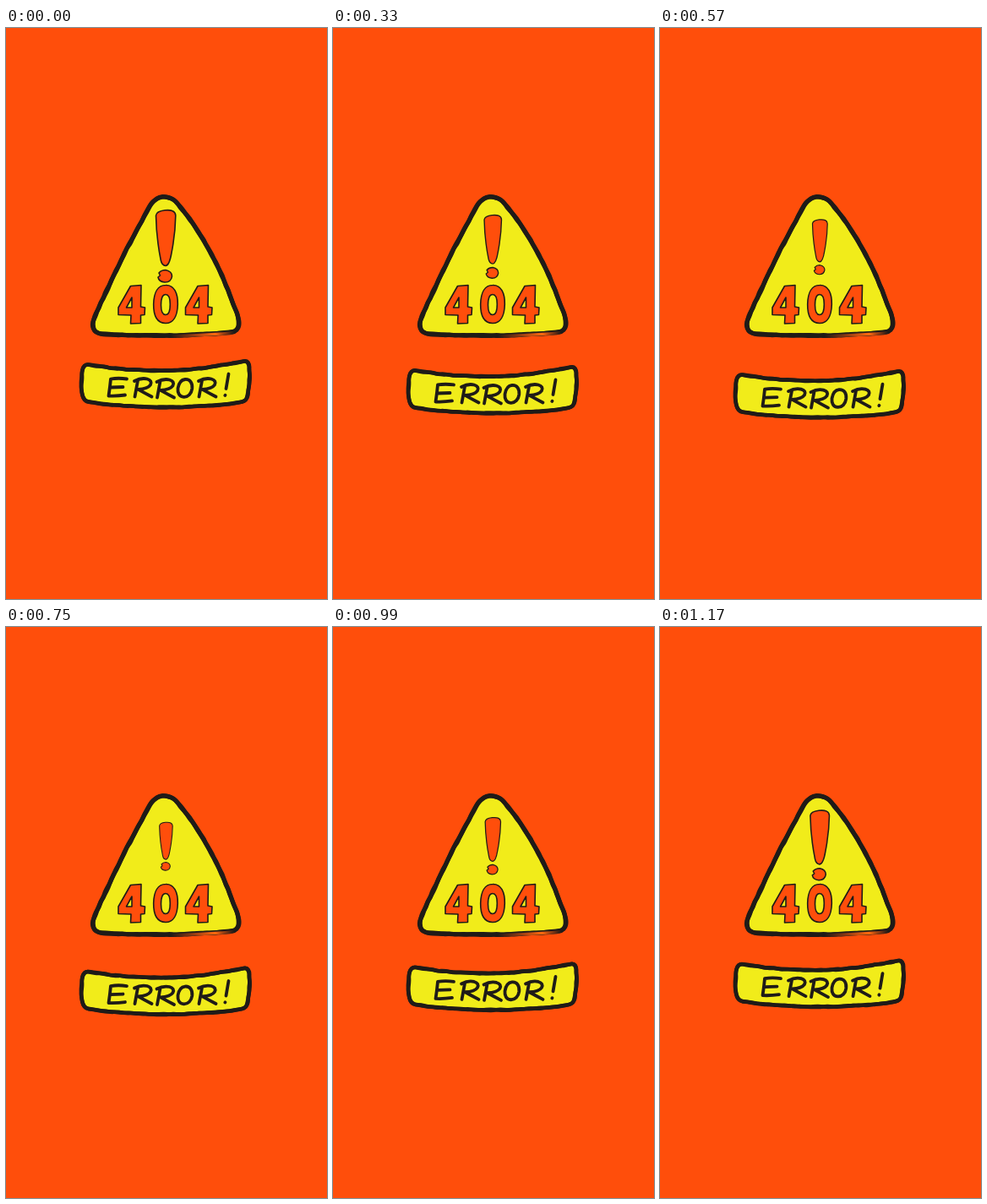
An HTML page for the animation above (1200 ms loop, 380 px wide and 676 px high).

```html
<!DOCTYPE html>
<html lang="en">
<head>
<meta charset="utf-8">
<title>404 error</title>
<style>
  html, body { margin: 0; width: 100%; height: 100%; overflow: hidden; background: #ff4e0b; }
  svg { display: block; width: 100vw; height: 100vh; }
  path { stroke: #1f1b18; stroke-linecap: round; stroke-linejoin: round; }
  .panel { fill: #f1ec1a; }
  .digit { fill: #ff4e0b; stroke-width: 1.6; fill-rule: evenodd; }
  .pen { fill: none; stroke-width: 3.8; }
</style>
</head>
<body>
<svg viewBox="0 0 380 676" role="img" aria-label="404 ERROR!">
  <defs>
    <linearGradient id="fade" gradientUnits="userSpaceOnUse" x1="195" y1="0" x2="270" y2="0">
      <stop offset="0" stop-color="#ff4e0b" stop-opacity="0"/>
      <stop offset="0.7" stop-color="#ff6a0e"/>
      <stop offset="1" stop-color="#ff4e0b" stop-opacity="0"/>
    </linearGradient>
  </defs>
  <rect width="380" height="676" fill="#ff4e0b"/>

  <path class="panel" data-width="5.2" d="M169 213Q176 199.500 187 199.500Q199 200 207 213Q249 264 275 344Q279 358 268 360Q190 367 112 362Q99 360 104 345Q130 283 169 213Z"/>
  <path d="M195 365Q232 364 270 361" fill="none" style="stroke: url(#fade)" stroke-width="3.500"/>
  <g class="digit">
    <path id="four" d="M147.500 305.500L160 304.500L159.500 330L164.500 331L164 339.500L159.500 340L159.500 349.500L147.500 350L148 340L133 339.500L133 331ZM149 319L142.500 331L149 331Z"/>
    <path d="M189 304.500C199 304 203.500 314 203.300 327C203 341 198 349.500 189 349.500C179 349.500 174.500 341 174.700 327C175 313 180 304.500 189 304.500ZM189 315.500C185 315.500 183.500 321 183.500 328C183.500 335 185.500 339.500 189 339.500C192.500 339.500 194.300 335 194.300 327C194.300 320 192.500 315.500 189 315.500Z"/>
    <use href="#four" x="79.500"/>
  </g>
  <g id="mark" class="digit">
    <path d="M177.500 222Q178 217 188 215.800Q200.500 214.500 200.800 222Q200.500 243 196 266Q193.500 281 189 281.500Q184.500 281 183.300 275Q178 249 177.500 222Z"/>
    <path d="M181 290Q184 286.500 189 286.500Q196.500 288 196.500 294Q195.500 301 188 301Q181 300.500 180 295L182.500 293Z"/>
  </g>

  <g id="plate">
    <path class="panel" data-width="4.600" d="M95 398Q190 415 283 394Q288 394 288 400Q289 420 286 437Q285 442 278 443Q190 455 99 443Q91 442 90 434Q88 420 91 403Q92 398 95 398Z"/>
    <g class="pen">
      <path d="M143 415.500Q133 414 124 415.500Q123 426 121.500 435.500Q131 436 141 434.500M124 425.500L138.500 425"/>
      <path id="r" d="M156 417.500L152.500 436.500M152 418Q160 413.800 167 415.500Q173.500 417.500 171 422.500Q168 427 156.500 427.800Q164 432 172.500 436.500"/>
      <use href="#r" x="26.500" y="1"/>
      <path d="M212 416C218 415.500 221 420.500 220.300 427C219.500 433 215.500 437 210.500 436.800C205 436.500 203 432 203.500 426.500C204.500 420.500 207.500 416.500 212 416Z"/>
      <use href="#r" x="76"/>
      <path d="M263.500 409.500L260.500 427M259.300 435L259.500 434.700"/>
    </g>
  </g>
</svg>
<script>
const LOOP = 1200, STEP = 30;
const mark = document.getElementById('mark');
const plate = document.getElementById('plate');

let seed = 7;
const rand = () => (seed = seed * 16807 % 2147483647) / 2147483647;
const jitter = size => (rand() - 0.5) * size;

// Walk along a clean outline and return it with a shaky hand.
function shaky(path) {
  const length = path.getTotalLength();
  const count = Math.round(length / 6);
  const pts = Array.from({ length: count }, (_, i) => {
    const { x, y } = path.getPointAtLength(length * i / count);
    return [x + jitter(1.2), y + jitter(1.2)];
  });
  const mid = (p, q) => [(p[0] + q[0]) / 2, (p[1] + q[1]) / 2];
  const curves = pts.map((p, i) => `Q${p} ${mid(p, pts[(i + 1) % count])}`);
  return `M${mid(pts[count - 1], pts[0])}${curves.join('')}Z`;
}

// Two uneven passes of ink give a line of varying weight.
for (const path of document.querySelectorAll('.panel')) {
  const second = path.cloneNode();
  second.setAttribute('d', shaky(path));
  second.style.fill = 'none';
  path.setAttribute('d', shaky(path));
  for (const p of [path, second]) p.style.strokeWidth = path.dataset.width;
  path.after(second);
}

function draw(ms) {
  const t = Math.floor(ms % LOOP / STEP) * STEP;
  const low = 800;
  const shrink = t < low ? t / low : (LOOP - t) / (LOOP - low);
  const size = t < low ? 1 - 0.36 * shrink ** 1.2 : 0.64 + 0.36 * (1 - shrink) ** 1.2;
  const drop = 12.7 * (1 - Math.abs(1 - t / 600));
  mark.setAttribute('transform',
    `translate(190 262.4) scale(${size}) translate(-190 -262.4)`);
  plate.setAttribute('transform', `translate(0 ${drop})`);
}

let start;
function tick(now) {
  start ??= now;
  draw(Math.max(0, now - start));
  requestAnimationFrame(tick);
}
draw(0);
requestAnimationFrame(tick);
</script>
</body>
</html>
```
